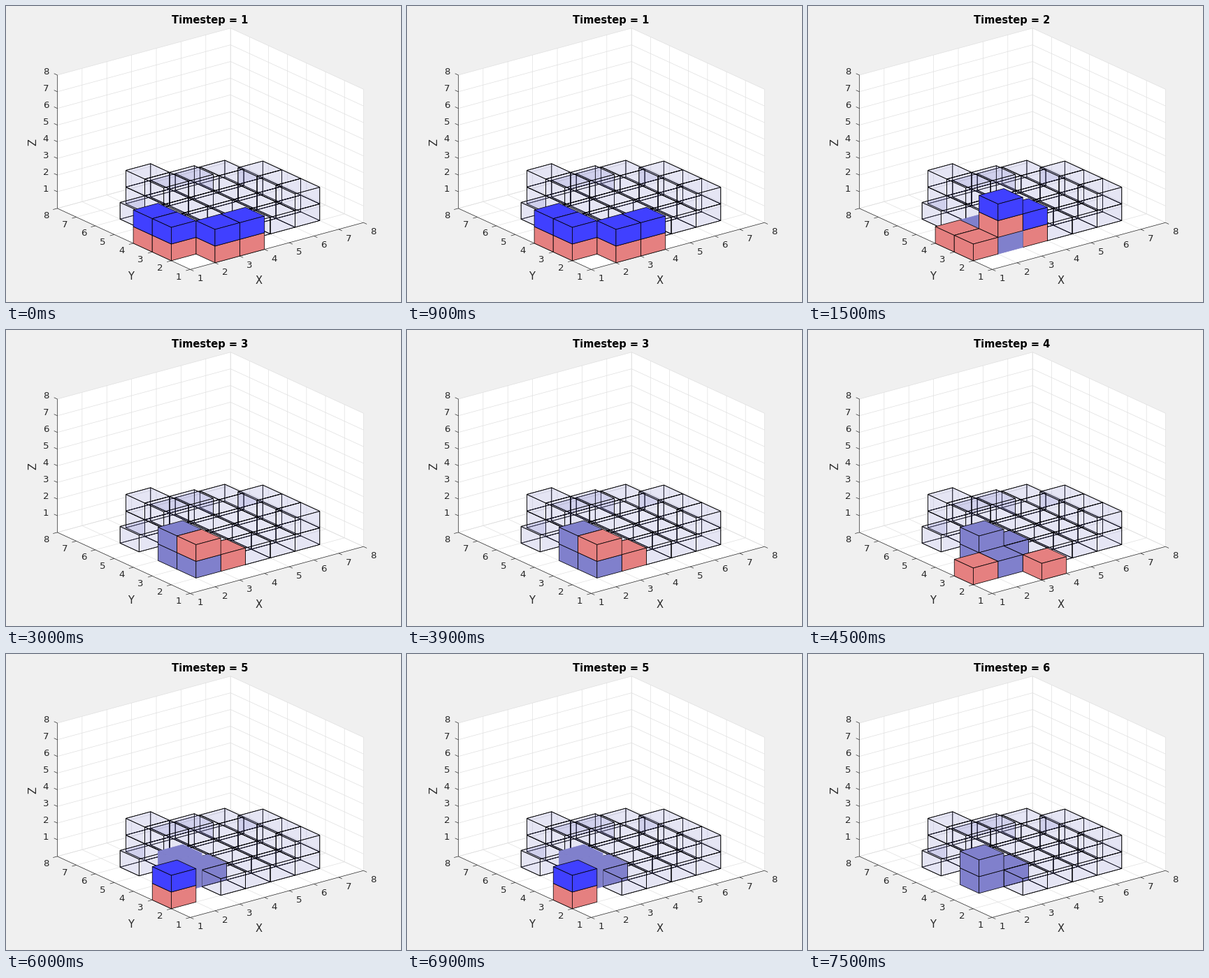
Animation of 565 by 424 pixels, one loop 8 s. Source, as a matplotlib script:

```python
import numpy as np
import matplotlib.pyplot as plt
from matplotlib.animation import ArtistAnimation
from matplotlib.collections import LineCollection, PolyCollection

W, H, DPI = 565, 424, 100
PX = 72 / DPI
plt.rcParams["font.family"] = "DejaVu Sans"

INK = "#262626"
RED, BLUE, PURPLE = "#e58080", "#4040ff", "#8080cc"
GHOST = (0.5, 0.5, 0.8, 0.2)
CLEAR = (0, 0, 0, 0)

# Orthographic view (azimuth -37.5, elevation 30) stretched to fill the axes box
AZ, EL = np.radians(37.5), np.radians(30)
CA, SA, CE, SE = np.cos(AZ), np.sin(AZ), np.cos(EL), np.sin(EL)
SX = 0.775 * W / (CA + SA)
SY = 0.815 * H / ((CA + SA) * SE + CE)
UX = np.array([CA * SX, -SA * SE * SY]) / 7
UY = np.array([-SA * SX, -CA * SE * SY]) / 7
UZ = np.array([0, -CE * SY]) / 8
ORIGIN = np.array([0.13 * W + SA * SX, 0.89 * H])


def proj(x, y, z):
    return ORIGIN + (x - 1) * UX + (y - 1) * UY + z * UZ


fig = plt.figure(figsize=(W / DPI, H / DPI), dpi=DPI, facecolor="#f0f0f0")
ax = fig.add_axes([0, 0, 1, 1])
ax.set(xlim=(0, W), ylim=(H, 0))
ax.axis("off")


def text(x, y, s, size, **kw):
    kw = {"color": INK, "ha": "center", "va": "center", **kw}
    return ax.text(x, y, s, fontsize=size * PX, **kw)


def draw_axes():
    for wall in ([(1, 1, 0), (8, 1, 0), (8, 8, 0), (1, 8, 0)],
                 [(8, 1, 0), (8, 8, 0), (8, 8, 8), (8, 1, 8)],
                 [(1, 8, 0), (8, 8, 0), (8, 8, 8), (1, 8, 8)]):
        ax.fill(*np.transpose([proj(*p) for p in wall]), "w", lw=0)

    grid = []
    for k in range(1, 9):
        grid += [[proj(k, 1, 0), proj(k, 8, 0), proj(k, 8, 8)],
                 [proj(1, k, 0), proj(8, k, 0), proj(8, k, 8)]]
    for k in range(9):
        grid.append([proj(1, 8, k), proj(8, 8, k), proj(8, 1, k)])
    ax.add_collection(LineCollection(grid, colors="#dfdfdf", lw=0.67 * PX))

    rules = [[proj(8, 1, 0), proj(1, 1, 0), proj(1, 8, 0), proj(1, 8, 8)]]
    for k in range(1, 9):
        for p, step, dx, dy in ((proj(k, 1, 0), -UY, 14, 13.5),
                                (proj(1, k, 0), -UX, -16.5, 11),
                                (proj(1, 8, k), UY, -16.5, -4)):
            rules.append([p, p + 0.175 * step])
            text(p[0] + dx, p[1] + dy, str(k), 13.33)
    ax.add_collection(LineCollection(rules, colors=INK, lw=0.67 * PX))

    text(362, 393, "X", 14.67)
    text(178, 388, "Y", 14.67)
    text(39, 195, "Z", 14.67, rotation=90)


def faces(x, y, z):
    """Three hidden faces, then the three facing the viewer with their neighbours."""
    X, Y, Z = x + 1, y + 1, z + 1
    back = [[(x, y, z), (X, y, z), (X, Y, z), (x, Y, z)],
            [(X, y, z), (X, Y, z), (X, Y, Z), (X, y, Z)],
            [(x, Y, z), (X, Y, z), (X, Y, Z), (x, Y, Z)]]
    front = [((x, y, Z), [(x, y, Z), (X, y, Z), (X, Y, Z), (x, Y, Z)]),
             ((x - 1, y, z), [(x, y, z), (x, Y, z), (x, Y, Z), (x, y, Z)]),
             ((x, y - 1, z), [(x, y, z), (X, y, z), (X, y, Z), (x, y, Z)])]
    return back, front


def draw_cubes(ghosts, solids, bare):
    polys, fills, edges = [], [], []

    def add(corners, fill, edge="k"):
        polys.append([proj(*c) for c in corners])
        fills.append(fill)
        edges.append(edge)

    cells = {**{c: GHOST for c in ghosts}, **solids}
    for cell in sorted(cells, key=lambda c: (-c[0], -c[1], c[2])):
        color = cells[cell]
        back, front = faces(*cell)
        if color == GHOST:
            for quad in back:
                add(quad, CLEAR)
        for neighbour, quad in front:
            if color == GHOST:
                add(quad, CLEAR if neighbour in cells else GHOST)
            else:
                add(quad, color, color if bare and color == PURPLE else "k")
    cubes = PolyCollection(polys, facecolors=fills, edgecolors=edges,
                           lw=0.75 * PX, joinstyle="round", zorder=3)
    return ax.add_collection(cubes)


block = [(x, y, 0) for x in range(3, 7) for y in range(2, 7)]
upper = [(3, 6, 1), (3, 5, 1), (4, 5, 1), (6, 2, 1), (6, 3, 1), (6, 4, 1)]
ghosts = block + upper + [(2, 5, 0)]

pair = {(2, 2, 0): PURPLE, (2, 3, 0): PURPLE}
wall = {(2, 3, 0): PURPLE, (2, 3, 1): PURPLE, (3, 3, 0): PURPLE}
steps = [
    {(x, y, z): c for x, y in ((1, 2), (1, 3), (2, 1), (3, 1))
     for z, c in enumerate((RED, BLUE))},
    {**pair, (1, 2, 0): RED, (1, 3, 0): RED, (2, 2, 1): RED, (2, 2, 2): BLUE,
     (3, 2, 0): RED, (3, 2, 1): BLUE},
    {**pair, (2, 3, 1): PURPLE, (2, 2, 1): RED, (3, 2, 0): RED},
    {**pair, **wall, (1, 2, 0): RED, (3, 1, 0): RED},
    {**wall, (1, 2, 0): RED, (1, 2, 1): BLUE},
    wall,
]

draw_axes()
scenes = []
for n, solids in enumerate(steps):
    extra = [(2, 2, 0), (2, 3, 0)] if n == 0 else []
    title = text(292, 20, f"Timestep = {n + 1}", 14.67, color="k", weight="bold")
    scenes.append([draw_cubes(ghosts + extra, solids, BLUE in solids.values()), title])

# Each step holds for three ticks; the last is cut short by the loop
anim = ArtistAnimation(fig, [scenes[i // 3] for i in range(16)],
                       interval=500, repeat=True, repeat_delay=0, blit=False)
plt.show()
```
